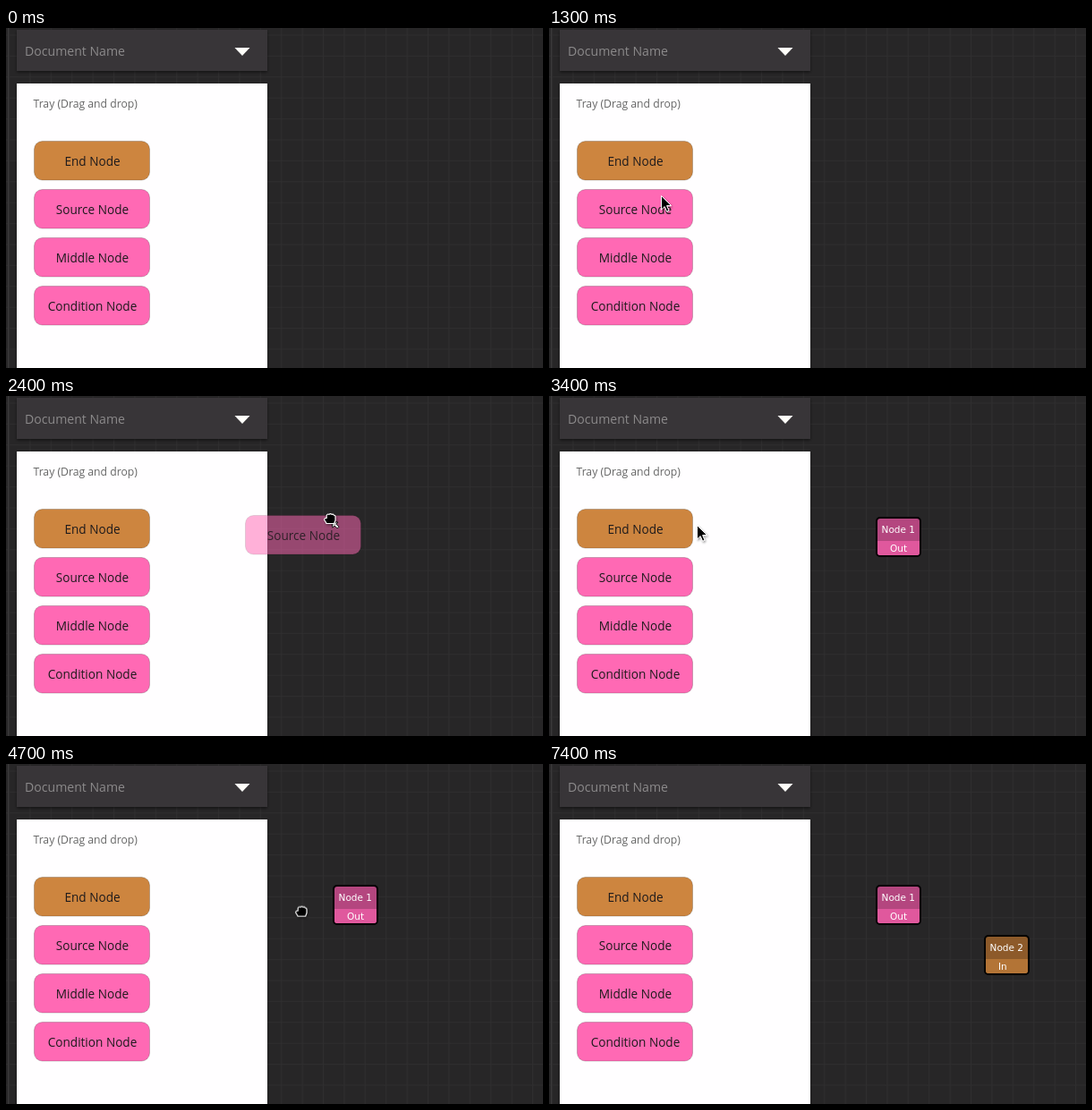
Animation, 600 px wide and 380 px high, one loop 8100 ms. Source, as an HTML page:

```html
<!DOCTYPE html>
<html lang="en">
<head>
<meta charset="utf-8">
<title>Node tray</title>
<style>
html, body { margin: 0; width: 100%; height: 100%; overflow: hidden; background: #272627; }
svg { display: block; }
text { font: 13.6px "Open Sans", "Noto Sans", sans-serif; }
.mid { text-anchor: middle; }
.btn rect { width: 129px; height: 43.5px; rx: 9px; fill: #ff69b4; stroke: #0003; }
.btn text { fill: #1d1a1c; text-anchor: middle; }
.btn.end rect { fill: #cd853f; }
.node text { font: 10.5px "DejaVu Sans", sans-serif; fill: #fff; text-anchor: middle; }

/* 8.1 s loop; motion advances in 100 ms steps */
#ptr { animation: move 8.1s infinite; }
#arrow, #hand, #ghost, #node1, #node2 { opacity: 0; animation: 8.1s step-end infinite; }
#arrow { animation-name: arrow; }
#hand { animation-name: hand; }
#ghost { animation-name: ghost; }
#node1 { animation-name: node1; }
#node2 { animation-name: node2; }

@keyframes move {
  0%, 1.234% { transform: translate(477px, 354px); animation-timing-function: steps(4); }
  6.172% { transform: translate(395px, 345px); animation-timing-function: steps(4); }
  11.111% { transform: translate(256px, 300px); animation-timing-function: steps(4); }
  16.049% { transform: translate(125px, 187px); animation-timing-function: steps(3); }
  19.753% { transform: translate(126px, 185px); animation-timing-function: steps(2); }
  22.222% { transform: translate(151px, 185px); animation-timing-function: steps(2); }
  24.691% { transform: translate(215px, 175px); animation-timing-function: steps(4); }
  29.629% { transform: translate(362px, 138px); animation-timing-function: steps(2); }
  32.098%, 34.567% { transform: translate(366px, 135px); animation-timing-function: steps(2); }
  37.037% { transform: translate(315px, 150px); animation-timing-function: steps(4); }
  41.975% { transform: translate(165px, 144px); animation-timing-function: steps(3); }
  45.679%, 48.148% { transform: translate(135px, 149px); animation-timing-function: steps(4); }
  53.086% { transform: translate(220px, 151px); animation-timing-function: steps(2); }
  55.555% { transform: translate(268px, 155px); animation-timing-function: steps(7); }
  64.197%, 100% { transform: translate(485px, 192px); }
}
@keyframes arrow {
  0% { opacity: 0; }
  1.234% { opacity: 1; }
  19.753% { opacity: 0; }
  34.567% { opacity: 1; }
  48.148%, 100% { opacity: 0; }
}
@keyframes hand {
  0% { opacity: 0; }
  19.753% { opacity: 1; }
  34.567% { opacity: 0; }
  48.148% { opacity: 1; }
  80.246%, 100% { opacity: 0; }
}
@keyframes ghost {
  0% { opacity: 0; }
  19.753% { opacity: 1; }
  34.567%, 100% { opacity: 0; }
}
@keyframes node1 { 0% { opacity: 0; } 34.567%, 100% { opacity: 1; } }
@keyframes node2 { 0% { opacity: 0; } 65.432%, 100% { opacity: 1; } }
</style>
</head>
<body>
<svg width="600" height="380" viewBox="0 0 600 380">
  <defs>
    <pattern id="grid" x="3" y="7.5" width="23.4" height="23.4" patternUnits="userSpaceOnUse">
      <path d="M.5 0V23.4M0 .5H23.4" stroke="#2f2e2f"/>
    </pattern>
    <filter id="shade" x="-10%" y="-20%" width="120%" height="150%">
      <feDropShadow dx="0" dy="1.5" stdDeviation="1.5" flood-opacity=".5"/>
    </filter>
    <filter id="soft" x="-50%" y="-50%" width="220%" height="220%">
      <feDropShadow dx="1" dy="1.5" stdDeviation=".8" flood-opacity=".4"/>
    </filter>
  </defs>

  <rect width="600" height="380" fill="#272627"/>
  <rect width="600" height="380" fill="url(#grid)"/>
  <path d="M2.5 0V380" stroke="#3a393a"/>

  <rect x="12" y="2" width="280" height="46" fill="#383637" filter="url(#shade)"/>
  <text x="21" y="31" fill="#8c8a8b" style="font-size:14.1px">Document Name</text>
  <path d="M255.5 22H272.5L264 31Z" fill="#fffefa"/>

  <rect x="12" y="62" width="280" height="330" fill="#fffeff" filter="url(#shade)"/>
  <text x="30.5" y="89" fill="#666" style="font-size:12.2px;font-weight:500">Tray (Drag and drop)</text>

  <g class="btn end" transform="translate(31.5 126.5)"><rect/><text x="65" y="27">End Node</text></g>
  <g class="btn" transform="translate(31.5 180.5)"><rect/><text x="65" y="27">Source Node</text></g>
  <g class="btn" transform="translate(31.5 234.5)"><rect/><text x="65" y="27">Middle Node</text></g>
  <g class="btn" transform="translate(31.5 288.5)"><rect/><text x="65" y="27">Condition Node</text></g>

  <g id="node1"><g class="node" transform="translate(365 135)">
    <rect width="51" height="45" rx="5"/>
    <rect x="2" y="2" width="47" height="41" rx="3" fill="#b4467f"/>
    <path d="M2 27H49V40Q49 43 46 43H5Q2 43 2 40Z" fill="#e0589d"/>
    <text x="25.3" y="18">Node 1</text><text x="25.5" y="38.5">Out</text>
  </g></g>
  <g id="node2"><g class="node" transform="translate(486 191)">
    <rect width="51" height="45" rx="5"/>
    <rect x="2" y="2" width="47" height="41" rx="3" fill="#8d5a2a"/>
    <path d="M2 27H49V40Q49 43 46 43H5Q2 43 2 40Z" fill="#b37436"/>
    <text x="25.3" y="18">Node 2</text><text x="20.8" y="38.5">In</text>
  </g></g>

  <g id="ptr">
    <g id="ghost">
      <g class="btn" transform="translate(-94.5 -4.5)" opacity=".52"><rect/></g>
      <text class="mid" x="-29.5" y="22.5" fill="#1d1a1c" opacity=".85">Source Node</text>
      <path d="M2 3H9L7 5.2L10 8.2L8.2 10L5.2 7L3 9.2Z" fill="#fff" stroke="#111"/>
    </g>
    <path id="arrow" filter="url(#soft)" fill="#000" stroke="#fff" d="M.5 .5V16L4.2 12.6 6.6 18.2 9 17.2 6.6 11.6H11.6Z"/>
    <path id="hand" filter="url(#soft)" fill="#000" stroke="#fff" stroke-width="1.1" d="M-4 4L-6.3 .5Q-6.3-1.8-3.8-1.6V-4.6Q-2.8-6.6-1-5.6Q.4-7 2-5.6Q3.4-6.4 4.4-4.8Q6-5 6-3V1L4.6 4.5H-4Z"/>
  </g>
</svg>
</body>
</html>
```
